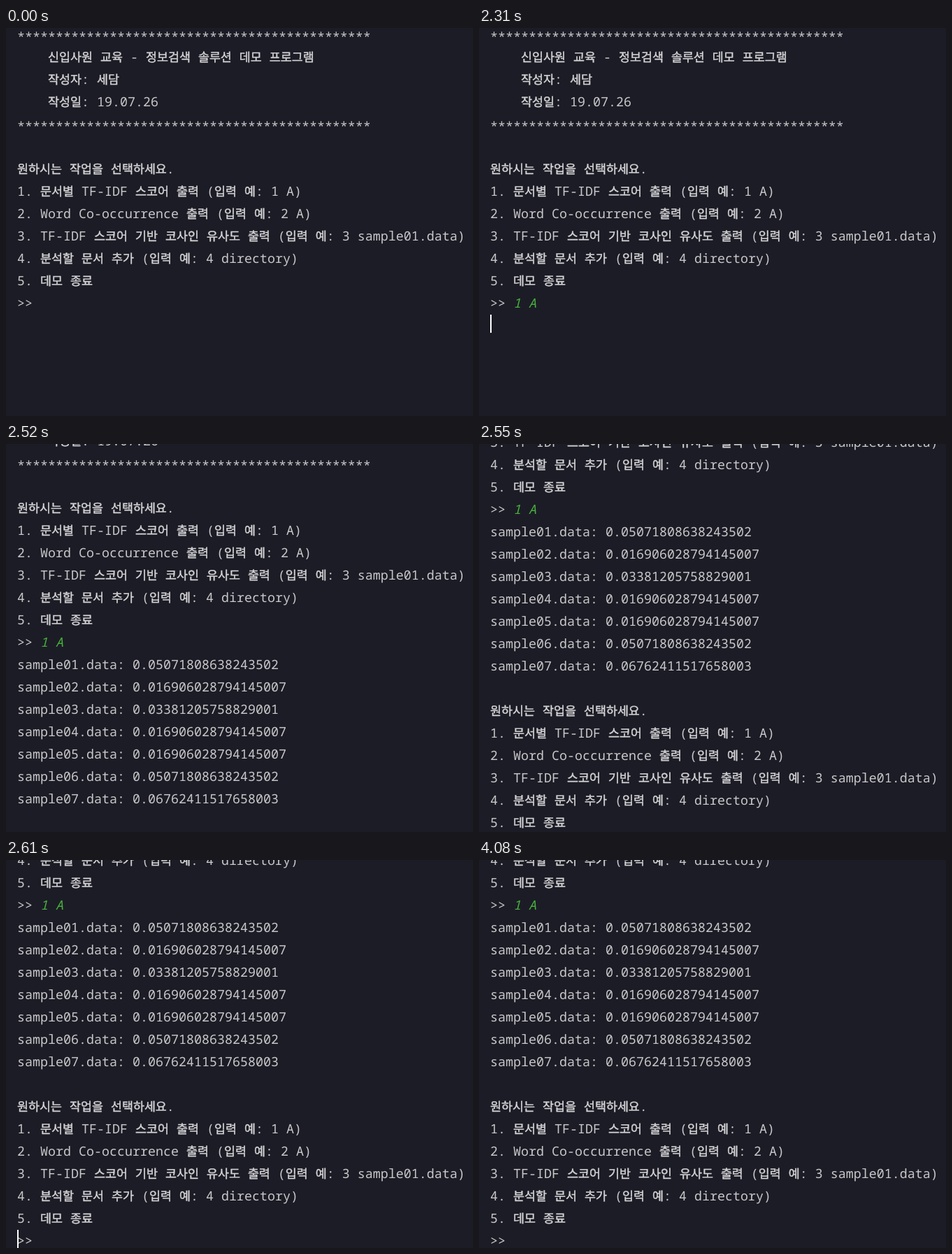
An HTML page for the animation above (4620 ms loop, 668x555 px).

```html
<!DOCTYPE html>
<html lang="ko">
<head>
<meta charset="utf-8">
<style>
html, body { margin: 0; width: 100%; height: 100%; overflow: hidden; background: #1c1c26; }
#screen { position: absolute; left: 0; top: 0; width: 668px; height: 555px; overflow: hidden; }
#page { position: absolute; left: 0; top: -6px; }
pre {
  margin: 0 0 0 16px; color: #c8c8ca; text-rendering: geometricPrecision;
  font: 18.333px/32px "Noto Sans Mono", monospace; font-variant-ligatures: none;
}
pre span { line-height: 0; }
.ko {
  font-family: "Noto Sans CJK KR", "Noto Sans CJK", sans-serif; font-size: 17.39px; font-weight: 500;
  color: #d4d4d6; -webkit-text-stroke: 0.45px #d4d4d6;
}
.stars { position: relative; top: 3px; }
.typed { color: #47b13c; font-style: italic; }
#caret { position: absolute; width: 2px; height: 26px; background: #fff; }
</style>
</head>
<body>
<div id="screen"><div id="page"><pre id="text"></pre><div id="caret"></div></div></div>
<script>
const LOOP = 4620, LINE = 32, CHAR = 11, SCROLL = 329;
const page = document.getElementById('page');
const text = document.getElementById('text');
const caret = document.getElementById('caret');

const stars = '*'.repeat(46);
const header = `${stars}
    신입사원 교육 - 정보검색 솔루션 데모 프로그램
    작성자: 세담
    작성일: 19.07.26
${stars}

`;
const menu = `원하시는 작업을 선택하세요.
1. 문서별 TF-IDF 스코어 출력 (입력 예: 1 A)
2. Word Co-occurrence 출력 (입력 예: 2 A)
3. TF-IDF 스코어 기반 코사인 유사도 출력 (입력 예: 3 sample01.data)
4. 분석할 문서 추가 (입력 예: 4 directory)
5. 데모 종료
&gt;&gt; `;
const once = '0.016906028794145007', thrice = '0.05071808638243502';
const scores = [thrice, once, '0.03381205758829001', once, once, thrice, '0.06762411517658003'];
const results = scores.map((s, i) => `sample0${i + 1}.data: ${s}\n`).join('');

const style = s => s
  .replace(/[가-힣]+/g, '<span class="ko">$&</span>')
  .replace(/\*+/g, '<span class="stars">$&</span>');
const intro = style(header + menu), output = style('\n' + results + '\n' + menu);

// [start, typed characters, caret column, caret row]; column -1 hides the caret
const steps = [
  [0, 0, -1, 12], [630, 0, 3, 12], [1110, 0, -1, 12],
  [1260, 1, 4, 12], [1380, 2, 5, 12], [1740, 3, 6, 12],
  [2310, 3, 0, 13], [2490, 3, -1, 27], [2610, 3, 0, 27],
  [3090, 3, -1, 27], [3570, 3, 0, 27], [4080, 3, -1, 27]
];

const ease = u => u < 0.5 ? 4 * u ** 3 : 1 - 4 * (1 - u) ** 3;

function scrollAt(t) {
  if (t < 2490) return 0;
  const tick = Math.floor((t - 2490) / 30);
  return Math.round(SCROLL * ease(Math.min(1, 0.155 + 0.282 * tick)));
}

let shown = '';
function draw(now) {
  const t = now % LOOP;
  const [, typed, col, row] = steps.findLast(s => s[0] <= t);
  const html = intro + `<span class="typed">${'1 A'.slice(0, typed)}</span>` + (t < 2490 ? '' : output);
  if (html !== shown) text.innerHTML = shown = html;
  page.style.transform = `translateY(${-scrollAt(t)}px)`;
  caret.hidden = col < 0;
  caret.style.left = (col > 0 ? 15 : 16) + col * CHAR + 'px';
  caret.style.top = row * LINE + 'px';
  requestAnimationFrame(draw);
}
draw(0);
</script>
</body>
</html>
```
